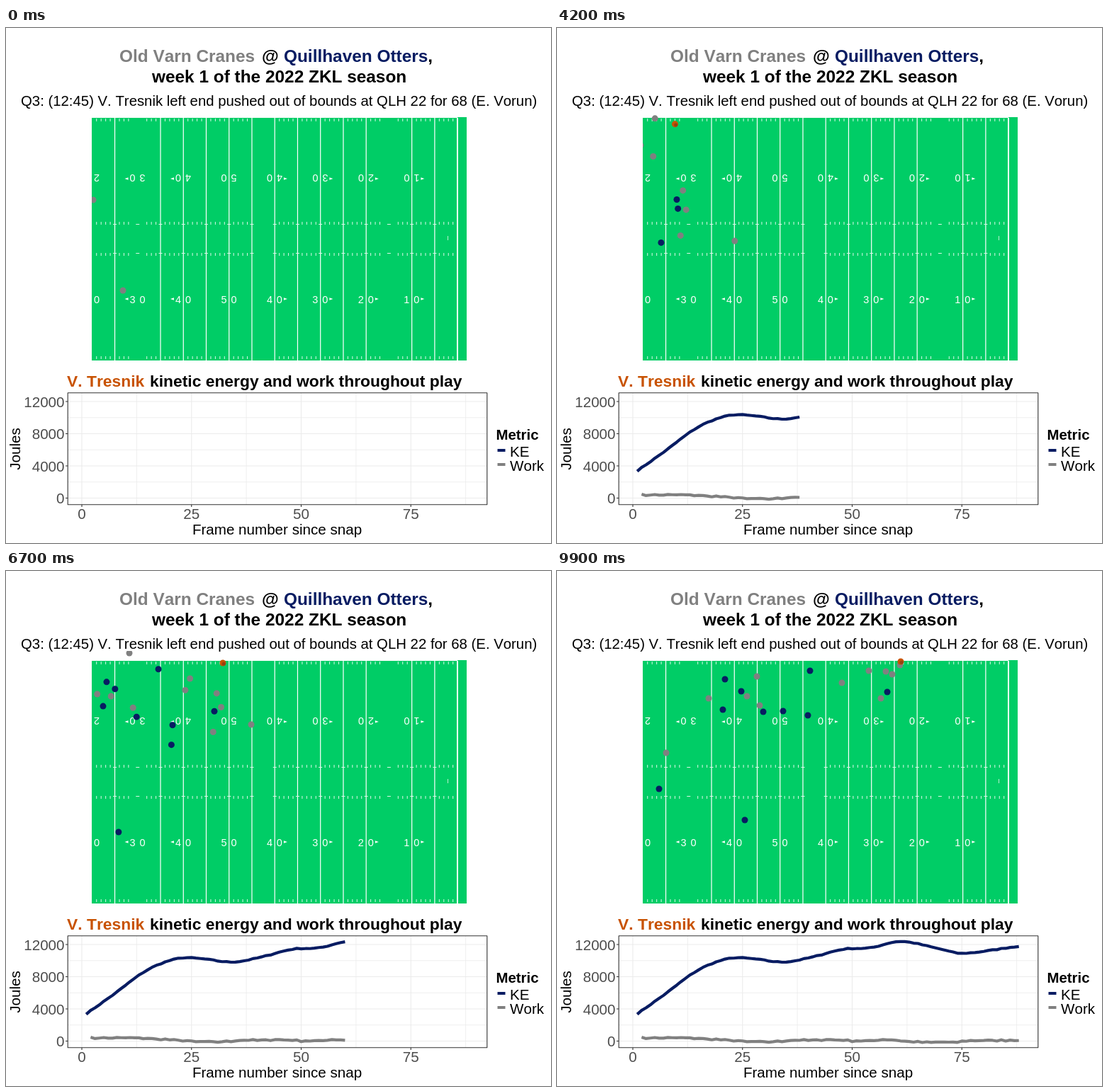
Animation of 769 by 728 pixels, one loop 10000 ms. Source, as an HTML page:

```html
<!DOCTYPE html>
<html lang="en">
<head>
<meta charset="utf-8">
<title>Kinetic energy and work</title>
<style>
html, body { margin: 0; width: 100%; height: 100%; overflow: hidden; background: #fff; }
svg { display: block; width: 769px; height: 728px; font-family: "Liberation Sans", Arial, sans-serif; font-kerning: none; }
text { white-space: pre; }
</style>
</head>
<body>
<svg id="stage" viewBox="0 0 769 728">
  <defs><clipPath id="pitch"><rect x="121" y="113" width="529" height="371"/></clipPath></defs>
</svg>
<script>
const NAVY = '#081c62', GREY = '#808080', ORANGE = '#c85200', GREEN = '#00cd66';
const stage = document.getElementById('stage');

function add(tag, attrs, parent = stage) {
  const el = document.createElementNS('http://www.w3.org/2000/svg', tag);
  for (const key in attrs) el.setAttribute(key, attrs[key]);
  parent.appendChild(el);
  return el;
}
function label(str, x, y, size, attrs = {}, parent = stage) {
  const el = add('text', { x, y, 'font-size': size, ...attrs }, parent);
  el.textContent = str;
  return el;
}
const bold = (fill = '#000') => ({ 'font-weight': 700, fill });
const path = (d, stroke, width) =>
  add('path', { d, stroke, 'stroke-width': width, fill: 'none', 'stroke-linejoin': 'round' });

// Headings
label('Old Varn Cranes', 160, 48, 24.4, bold(GREY));
label('@', 361, 48, 24.4, bold());
const away = label('Quillhaven Otters', 392, 48, 24.4, bold(NAVY));
add('tspan', { fill: '#000' }, away).textContent = ',';
label('week 1 of the 2022 ZKL season', 206, 77, 24.4, bold());
label('Q3: (12:45) V. Tresnik left end pushed out of bounds at QLH 22 for 68 (E. Vorun)', 21, 110, 20.35);

// Field
const yardX = yd => 121 + yd * 6.448;
add('rect', { x: 121, y: 127, width: 516, height: 343, fill: GREEN });
add('rect', { x: 637, y: 126, width: 13, height: 344, fill: GREEN });

function drawMarks() {
  let lines = '', ticks = '', dashes = '';
  for (let yd = 1; yd < 80; yd++) {
    const x = yardX(yd) + 0.3;
    const faded = Math.abs(yd - 10) < 2 || Math.abs(yd - 65) < 2;
    if (yd % 5 === 0) {
      if (!faded) lines += `M${x} 127V470`;
      dashes += `M${x - 2.5} 277.5h5M${x - 2.5} 318.5h5`;
    } else if (!faded && (yd < 35 || yd > 40)) {
      ticks += `M${x} 128v4M${x} 274v4M${x} 318v4M${x} 464v4`;
    }
  }
  path(lines, '#fff', 1.2);
  path(ticks + dashes, '#d9f8e8', 1);
  path('M637 127V470', '#fff', 2);
  path('M623.5 294v6', '#b5f0d2', 1);
}
drawMarks();

function drawNumber(yd) {
  const x = yardX(yd), tens = 5 - Math.abs(yd - 30) / 10;
  const group = add('g', { fill: '#fff', 'text-anchor': 'middle', 'clip-path': 'url(#pitch)' });
  for (const [y, turn] of [[384, 0], [212, 180]]) {
    const digits = add('g', { transform: `translate(${x} ${y}) rotate(${turn})` }, group);
    label(tens, -7, 5, 14.5, {}, digits);
    label(0, 7, 5, 14.5, {}, digits);
    if (yd === 30) continue;
    const side = Math.sign(yd - 30), ay = turn ? 213 : 383;
    add('path', { d: `M${x + side * 18} ${ay}l${-side * 5} -1.8v3.6z` }, group);
  }
}
for (let yd = 0; yd <= 70; yd += 10) drawNumber(yd);

// Chart
const chartX = n => 107 + n * 6.19;
const chartY = j => 664.5 - j * 0.011375;
label('V. Tresnik', 86, 507, 22.85, bold(ORANGE));
label('kinetic energy and work throughout play', 203, 507, 22.85, bold());

function drawAxes() {
  const mid = { 'text-anchor': 'middle' }, soft = { fill: '#4d4d4d' };
  let minor = '', major = '', ticks = '';
  for (let n = 0; n <= 87.5; n += 12.5) {
    const x = chartX(n), d = `M${x} 516V674`;
    if (n % 25) { minor += d; continue; }
    major += d;
    ticks += `M${x} 674v3`;
    label(n, x, 694, 20.6, { ...mid, ...soft });
  }
  for (let j = 0; j <= 12000; j += 2000) {
    const y = chartY(j), d = `M87 ${y}H679`;
    if (j % 4000) { minor += d; continue; }
    major += d;
    ticks += `M87 ${y}h-3`;
    label(j, 82.5, y + 7.5, 20.6, { 'text-anchor': 'end', ...soft });
  }
  path(minor, '#ebebeb', 0.8);
  path(major, '#ebebeb', 1.1);
  path('M87.2 515.8H678.8V673.8H87.2Z' + ticks, '#333', 1.1);
  label('Frame number since snap', 382.5, 716, 20.6, mid);
  label('Joules', 0, 0, 20.6, { ...mid, transform: 'translate(20 595) rotate(-90)' });
}
drawAxes();

label('Metric', 691.5, 582, 20.4, bold());
[['KE', NAVY, 597], ['Work', GREY, 617]].forEach(([name, color, y]) => {
  path(`M693.5 ${y}h11`, color, 4);
  label(name, 711, y + 8.5, 20.6);
});

// Smooth curve through [time, ...values] keys, straight beyond both ends.
function slope(keys, i, axis) {
  const a = keys[Math.max(0, i - 1)], b = keys[Math.min(keys.length - 1, i + 1)];
  return (b[axis] - a[axis]) / (b[0] - a[0]);
}
function at(keys, t, axis) {
  const last = keys.length - 1;
  if (t <= keys[0][0]) return keys[0][axis] + (t - keys[0][0]) * slope(keys, 0, axis);
  if (t >= keys[last][0]) return keys[last][axis] + (t - keys[last][0]) * slope(keys, last, axis);
  let i = 0;
  while (t > keys[i + 1][0]) i++;
  const a = keys[i], b = keys[i + 1], h = b[0] - a[0], u = (t - a[0]) / h, v = 1 - u;
  return v * v * (1 + 2 * u) * a[axis] + u * u * (1 + 2 * v) * b[axis]
    + h * u * v * (v * slope(keys, i, axis) - u * slope(keys, i + 1, axis));
}

// Energy follows a few turning points with a little jitter; work is its change per step.
const END = 88;
const turns = [
  [1, 3380], [7, 5700], [15, 8860], [22, 10270], [27, 10250], [34, 9820], [40, 10320],
  [48, 11420], [54, 11580], [61, 12380], [70, 11450], [75, 10900], [END, 11800]
];
let seed = 7;
const random = () => (seed = seed * 16807 % 2147483647) / 2147483647;
const energy = Array.from({ length: END }, (_, i) => at(turns, i + 1, 1) + (random() - 0.5) * 110);
const work = energy.slice(1).map((e, i) => e - energy[i]);
const workLine = path('', GREY, 4.2), energyLine = path('', NAVY, 4.2);

function trace(values, first, n) {
  const pts = values.slice(0, Math.max(0, n - first + 1));
  if (pts.length < 2) return '';
  return 'M' + pts.map((v, i) => chartX(first + i).toFixed(2) + ' ' + chartY(v).toFixed(2)).join('L');
}

// A run goes from one spot to another by the last step: x may gather pace, y levels off.
function run(from, pace, bend, [x0, y0, x1, y1, curve = bend]) {
  return n => {
    const u = (n - from) / (END - from);
    return [
      x0 + (x1 - x0) * Math.sign(u) * Math.abs(u) ** pace,
      y1 + (y0 - y1) * (1 - u) ** curve
    ];
  };
}
const steady = spots => run(45, 1, 1.4, spots);
const sprint = spots => run(31, 1.1, 1.5, spots);
const route = keys => n => [at(keys, n, 1), at(keys, n, 2)];

const carrier = route([[31, 125.5, 142], [45, 208.5, 131], [60, 306, 130], [70, 371, 136.5], [END, 485, 128]]);
const navy = [
  ...[
    [139, 137, 357, 141], [91, 160, 237, 153], [97, 164, 260, 170], [85, 187, 234, 196],
    [127, 212, 291, 199], [190, 234, 319, 198], [102, 383, 265, 352], [0, 345, 144, 308]
  ].map(steady),
  ...[[124, 325, 354, 204], [138, 280, 466, 171, 1.95]].map(sprint)
];
const grey = [
  ...[
    [83, 169, 214, 180], [84, 177, 268, 177], [122, 196, 286, 190],
    [163, 161, 440, 141], [173, 177, 402, 158], [10, 285, 154, 257]
  ].map(steady),
  ...[[146, 253, 464, 142, 1.8], [150, 281, 473, 146], [143, 318, 457, 180]].map(sprint),
  route([[1, 165, 371], [17, 198, 378], [31, 225, 328], [60, 346, 217], [END, 484, 133]]),
  route([[31, 122, 146], [45, 153, 114], [60, 174, 116], [END, 282, 149]]),
  route([[1, 123, 243], [6, 112, 243]])
];

const players = add('g', { 'clip-path': 'url(#pitch)' });
const dots = [];
const addDot = (move, fill, r = 4.5, shift = 0) =>
  dots.push({ move, shift, el: add('circle', { r, fill }, players) });
navy.forEach(move => addDot(move, NAVY));
grey.forEach(move => addDot(move, GREY));
addDot(carrier, ORANGE);
addDot(carrier, '#964012', 2.5, 1.2);

function draw(n) {
  for (const { move, shift, el } of dots) {
    const [x, y] = move(n);
    el.setAttribute('cx', x + shift);
    el.setAttribute('cy', y + shift);
  }
  workLine.setAttribute('d', trace(work, 2, n));
  energyLine.setAttribute('d', trace(energy, 1, n));
}

const start = performance.now();
function tick() {
  const step = Math.floor(((performance.now() - start) % 10000) / 100);
  draw(Math.round(1 + step * (END - 1) / 99));
  requestAnimationFrame(tick);
}
tick();
</script>
</body>
</html>
```
